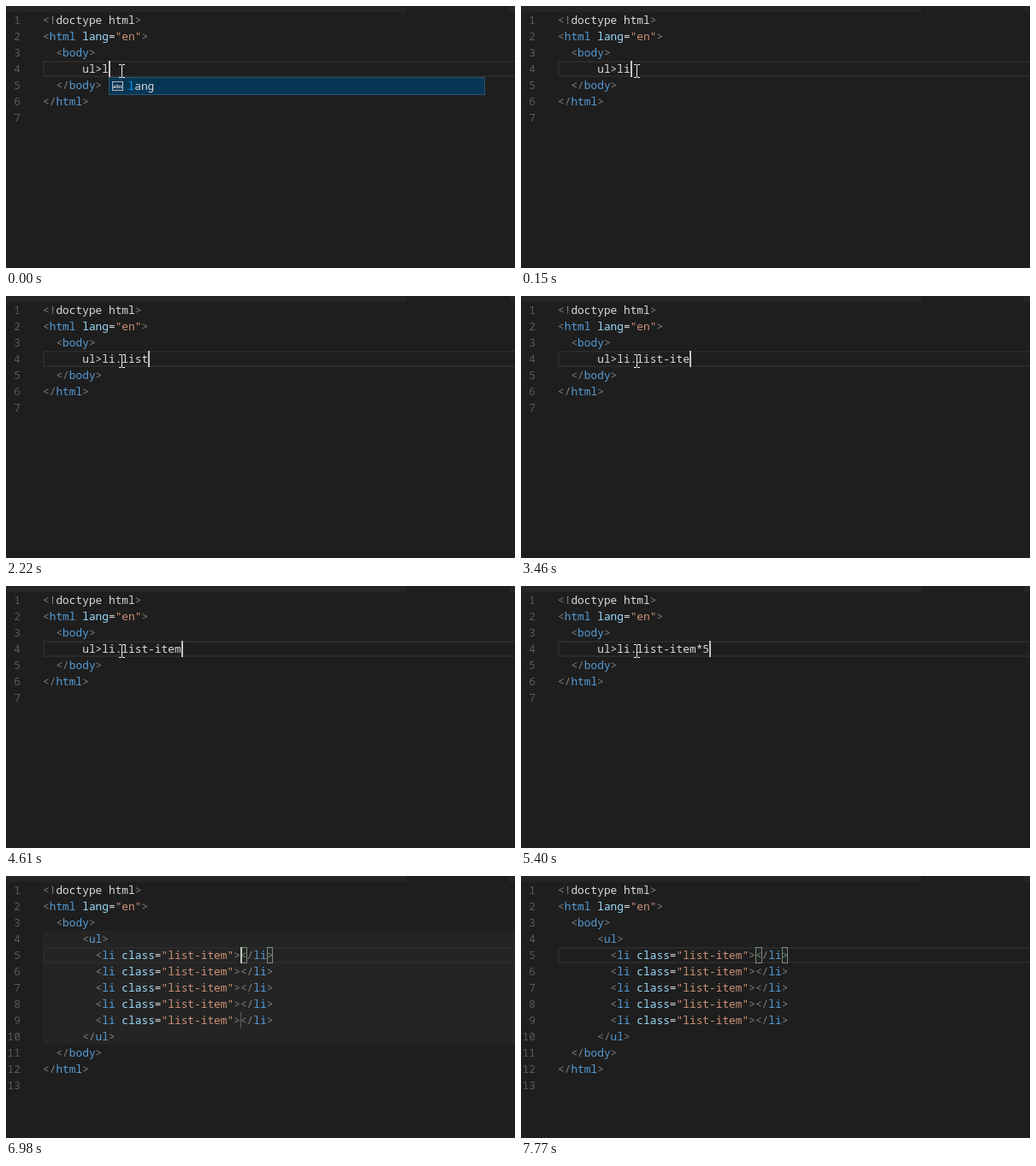
Write an HTML page with a canvas that moves like this. It is 595x306 px and loops after 7870 ms.

```html
<!DOCTYPE html>
<html lang="en">
<head>
<meta charset="utf-8">
<title>Abbreviation expansion in a code editor</title>
<style>
  html, body { margin: 0; width: 100%; height: 100%; overflow: hidden; background: #1e1e1e; }
  canvas { display: block; }
</style>
</head>
<body>
<canvas id="stage" width="595" height="306"></canvas>
<script>
const ctx = document.getElementById("stage").getContext("2d");
const WIDTH = 595, HEIGHT = 306, LOOP = 7870;
const LEFT = 43, TOP = 7, ROW = 19, ADVANCE = 7.697;
const FONT = '12.83px "Noto Sans Mono", "DejaVu Sans Mono", monospace';
const COLOR = {
  back: "#1e1e1e", tabs: "#252526", snippet: "#242424", line: "#2a2a2a",
  number: "#5a5a5a", plain: "#dadada", bracket: "#808080", tag: "#569cd6",
  attr: "#9cdcfe", string: "#ce9178", caret: "#c4c4c2"
};

const ABBREVIATION = "ul>li.list-item*5";
const EXPAND = 5970, SNIPPET_END = 7770;

// [time, typed characters, caret visible]
const TYPING = [
  [0, 4, 1], [150, 5, 1], [710, 5, 0], [960, 6, 1], [1390, 6, 0],
  [1670, 7, 1], [1790, 8, 1], [1910, 9, 1], [2220, 10, 1], [2640, 10, 0],
  [2910, 11, 1], [3220, 12, 1], [3340, 13, 1], [3460, 14, 1], [3620, 15, 1],
  [4040, 15, 0], [4610, 15, 1], [4730, 16, 1], [5280, 16, 0], [5400, 17, 1],
  [5970, 17, 1], [6400, 17, 0], [6980, 17, 1], [7520, 17, 0]
];

// [time, x, y], or only a time while the pointer is hidden
const POINTER = [[0, 135, 68], [6980], [7280, 549, 292], [7400]];

const HEAD = ["<!doctype html>", '<html lang="en">', "  <body>"];
const TAIL = ["  </body>", "</html>", ""];
const ITEM = '        <li class="list-item"></li>';
const LIST = ["      <ul>", ...Array(5).fill(ITEM), "      </ul>"];

const rowTop = row => TOP + (row - 1) * ROW;
const colX = col => LEFT + col * ADVANCE;
const latest = (steps, t) => steps.filter(s => s[0] <= t).pop();

function rect(color, x, y, w, h) {
  ctx.fillStyle = color;
  ctx.fillRect(x, y, w, h);
}

function frame(color, x, y, w, h, width = 1) {
  ctx.strokeStyle = color;
  ctx.lineWidth = width;
  ctx.strokeRect(x + width / 2, y + width / 2, w - width, h - width);
}

// Every character sits on the fixed-width grid.
function write(text, x, baseline, color) {
  ctx.font = FONT;
  ctx.fillStyle = color;
  [...text].forEach((ch, i) => ctx.fillText(ch, x + i * ADVANCE, baseline));
}

function tokens(text) {
  if (!text.trim().startsWith("<")) return [[text, 0, COLOR.plain]];
  const doctype = text.startsWith("<!");
  let opened = false;
  return [...text.matchAll(/<[!\/]?|>|"[^"]*"|\w+|=/g)].map(({ 0: part, index }) => {
    let color = COLOR.plain;
    if (/[<>]/.test(part)) color = COLOR.bracket;
    else if (part[0] === '"') color = COLOR.string;
    else if (part !== "=" && !doctype) color = opened ? COLOR.tag : COLOR.attr;
    opened = part[0] === "<";
    return [part, index, color];
  });
}

function drawLine(text, row) {
  const baseline = rowTop(row) + 14;
  const number = String(row);
  write(number, 17 - number.length * ADVANCE, baseline, COLOR.number);
  for (const [part, col, color] of tokens(text)) write(part, colX(col), baseline, color);
}

function drawBracketMatch(col, row) {
  const x = Math.round(colX(col)), right = Math.round(colX(col + 1));
  rect("rgba(0,100,0,.1)", x, rowTop(row), right - x, ROW);
  frame("#808880", x, rowTop(row), right - x, ROW);
}

function drawSuggestion() {
  rect("#073655", 120, 83, 440, 21);
  frame("#2b5470", 120, 83, 440, 21);
  frame("#b5b9bc", 124, 88, 13, 11);
  ctx.font = 'bold 6px "DejaVu Sans", sans-serif';
  ctx.fillStyle = "#c5c5c5";
  ctx.fillText("abc", 125, 96);
  write("l", 142.5, 98, "#0097fb");
  write("ang", 142.5 + ADVANCE, 98, COLOR.plain);
}

function drawPointer(x, y) {
  rect("#f0f0f0", x, y + 1, 1, 14);
  for (const dy of [0, 15]) {
    rect("#f0f0f0", x - 3, y + dy, 3, 1);
    rect("#f0f0f0", x + 1, y + dy, 3, 1);
  }
}

function draw(t) {
  const [, typed, caretOn] = latest(TYPING, t);
  const expanded = t >= EXPAND;
  const snippet = expanded && t < SNIPPET_END;
  const row = expanded ? 5 : 4;
  const col = expanded ? 30 : 6 + typed;
  const body = expanded ? LIST : ["      " + ABBREVIATION.slice(0, typed)];

  rect(COLOR.back, 0, 0, WIDTH, HEIGHT);
  rect(COLOR.tabs, 0, 0, 468, TOP);
  rect(COLOR.tabs, 588, 0, 7, TOP);
  if (snippet) rect(COLOR.snippet, LEFT, rowTop(4), WIDTH - LEFT, 7 * ROW);
  frame(COLOR.line, LEFT, rowTop(row), WIDTH - LEFT + 2, ROW, 2);

  if (expanded) [30, 34].forEach(c => drawBracketMatch(c, 5));
  [...HEAD, ...body, ...TAIL].forEach((text, i) => drawLine(text, i + 1));
  if (snippet) rect("#5c5c5c", Math.round(colX(30)), rowTop(9), 1, ROW);
  if (caretOn) rect(COLOR.caret, Math.round(colX(col)), rowTop(row), 2, ROW);
  if (t < 150) drawSuggestion();

  const [, x, y] = latest(POINTER, t);
  if (x !== undefined) drawPointer(x, y);
}

const start = performance.now();
function tick() {
  draw((performance.now() - start) % LOOP);
  requestAnimationFrame(tick);
}
tick();
</script>
</body>
</html>
```
